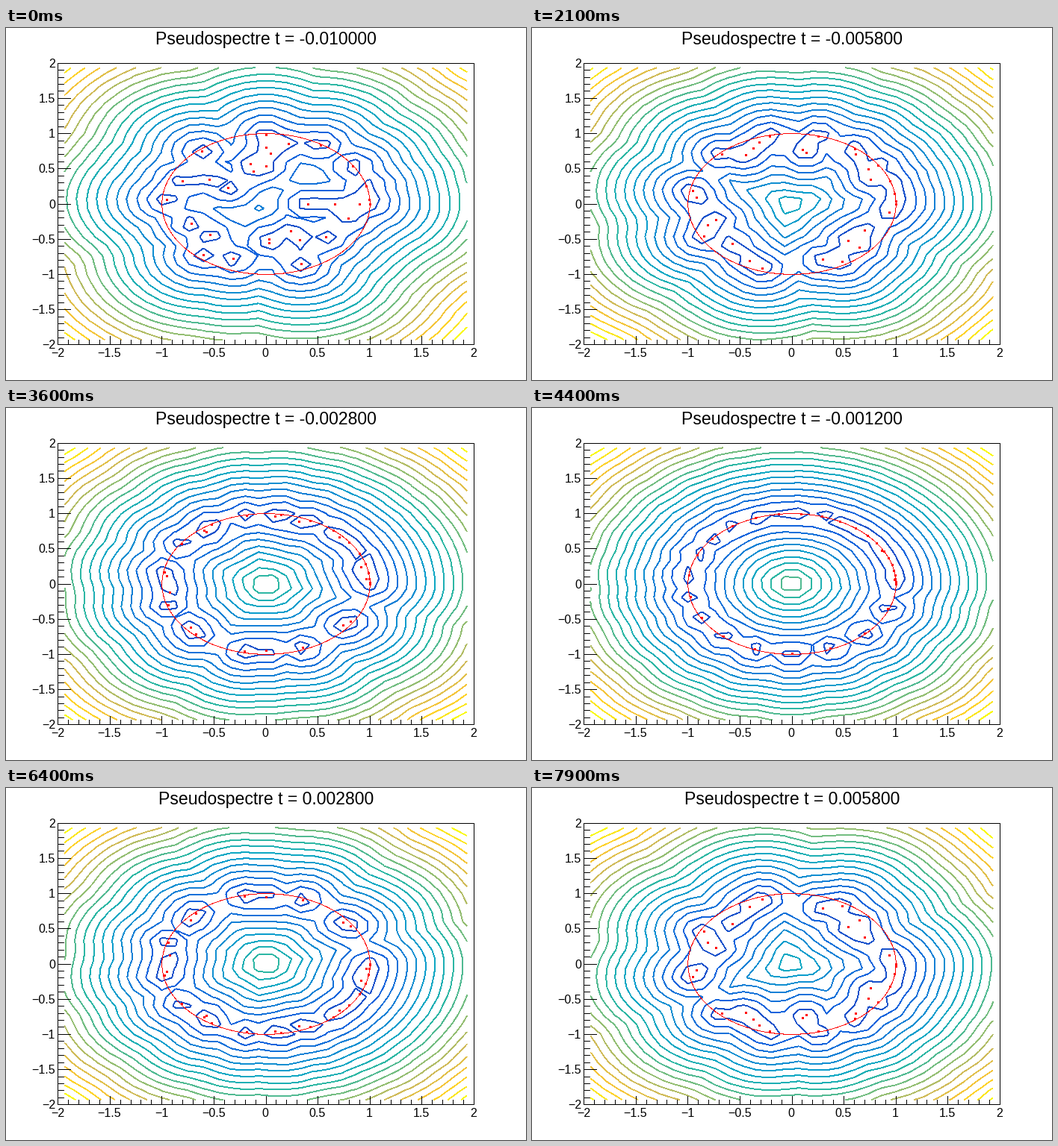
Animation of 696 by 472 pixels, one loop 8 s. Source, as a matplotlib script:

```python
import numpy as np
import matplotlib.pyplot as plt
from matplotlib.animation import FuncAnimation
from matplotlib.collections import LineCollection
from matplotlib.patches import Ellipse

W, H, DPI = 696, 472, 64
PT = 72 / DPI                      # one pixel in points
FRAMES, INTERVAL = 80, 100
BINS, LEVELS, MODES = 30, 20, 31
plt.rcParams["font.family"] = "Liberation Sans"


def px(x):
    return 0.1 * W + (np.asarray(x) + 2) / 4 * 0.8 * W


def py(y):
    return 0.9 * H - (np.asarray(y) + 2) / 4 * 0.8 * H


def pixel(v):
    """Centre of the pixel that holds v."""
    return np.floor(v + 1e-6) + 0.5


# blue - green - yellow palette
STOPS = np.linspace(0, 1, 9)
RED = [.2082, .0592, .0780, .0232, .1802, .5301, .8186, .9956, .9764]
GREEN = [.1664, .3599, .5041, .6419, .7178, .7492, .7328, .7862, .9832]
BLUE = [.5293, .8684, .8385, .7914, .6425, .4662, .3499, .1968, .0539]
SHADE = np.floor((np.arange(1, LEVELS) + 0.99) * 255 / LEVELS) / 255
COLORS = np.column_stack([np.interp(SHADE, STOPS, c) for c in (RED, GREEN, BLUE)])

centers = -2 + 4 / BINS * (np.arange(BINS) + 0.5)
X, Y = np.meshgrid(centers, centers)
Z = X + 1j * Y


def corners(a):
    """Corner values of every cell, counter-clockwise."""
    return [a[:-1, :-1], a[:-1, 1:], a[1:, 1:], a[1:, :-1]]


CX, CY = corners(px(X)), corners(py(Y))


def spectrum(t):
    k2 = np.arange(MODES) ** 2
    return np.exp(-2j * np.pi * k2 * t - 10.1 * k2 * t * t)


def contours(field):
    """Marching squares; at saddles the low corners are cut off."""
    lo, hi = field.min(), field.max()
    level = (lo + (hi - lo) / LEVELS * np.arange(1, LEVELS))[:, None, None]
    f = corners(field)
    up = [c >= level for c in f]
    edge = []
    for i in range(4):
        j = (i + 1) % 4
        d = f[j] - f[i]
        s = (level - f[i]) / np.where(d == 0, 1, d)
        edge.append((CX[i] + s * (CX[j] - CX[i]), CY[i] + s * (CY[j] - CY[i])))
    segs, ids = [], []
    for i in range(4):
        low = up[(i + 1) % 4]
        for run in (1, 2, 3):
            low = low & ~up[(i - run + 1) % 4]
            hit = low & up[(i - run) % 4]
            a, b = edge[i], edge[(i - run) % 4]
            ends = np.stack([a[0][hit], a[1][hit], b[0][hit], b[1][hit]], axis=1)
            segs.append(np.floor(ends).reshape(-1, 2, 2) + 0.2)
            ids.append(np.nonzero(hit)[0])
    return np.concatenate(segs), np.concatenate(ids)


def hard_edges(img, dpi):
    """Turn smooth line edges into whole pixels."""
    out = img.copy()
    out[..., 3] = img[..., 3] > 0.49
    return out, 0, 0


fig = plt.figure(figsize=(W / DPI, H / DPI), dpi=DPI, facecolor="white")
ax = fig.add_axes([0, 0, 1, 1])
ax.set_xlim(0, W)
ax.set_ylim(H, 0)
ax.axis("off")


def label(x, y, s, size, ha):
    return ax.text(x, y, s, fontsize=size * PT, ha=ha, va="baseline", color="black")


def strokes(lines, width, z, **style):
    art = LineCollection(lines, linewidths=width * PT, zorder=z, **style)
    art.set_snap(False)
    return ax.add_collection(art)


def draw_axes():
    left, right = pixel(px([-2, 2]))
    top, bottom = pixel(py([2, -2]))
    lines = [[(left, top), (right, top)], [(left, bottom), (right, bottom)],
             [(left, top), (left, bottom)], [(right, top), (right, bottom)]]
    for i in range(41):
        v = -2 + i / 10
        x, y = pixel(px(v)), pixel(py(v))
        major = i % 5 == 0
        lines.append([(x, bottom), (x, bottom - (11 if major else 6))])
        lines.append([(left, y), (left + (17 if major else 8), y)])
        if major:
            s = f"{v:g}".replace("-", "\u2212")
            label(px(v) - 0.7, 441, s, 16, "center")
            label(66, py(v) + 5.6, s, 16, "right")
    strokes(lines, 1, 3, colors="black", capstyle="projecting")


draw_axes()
curves = strokes([], 2, 2, capstyle="butt")
curves.set_agg_filter(hard_edges)
dots = strokes([], 3, 5, colors="red", capstyle="butt")
circle = Ellipse((px(0), py(0)), 0.4 * W, 0.4 * H, fill=False, ec="red",
                 lw=PT, zorder=4, snap=False)
circle.set_agg_filter(hard_edges)
ax.add_patch(circle)
title = label(W / 2, 22, "", 23, "center")


def update(n):
    t = (n - 50) * 0.0002
    eig = spectrum(t)
    field = np.abs(Z[..., None] - eig).min(axis=-1)
    segs, ids = contours(field)
    curves.set_segments(segs)
    curves.set_color(COLORS[ids])
    x, y = pixel(px(eig.real)), pixel(py(eig.imag))
    dots.set_segments(np.stack([x - 1.5, y, x + 1.5, y], axis=1).reshape(-1, 2, 2))
    title.set_text(f"Pseudospectre t = {t:f}")
    return curves, dots, title


anim = FuncAnimation(fig, update, frames=FRAMES, interval=INTERVAL,
                     repeat=True, repeat_delay=0, blit=False)
plt.show()
```
